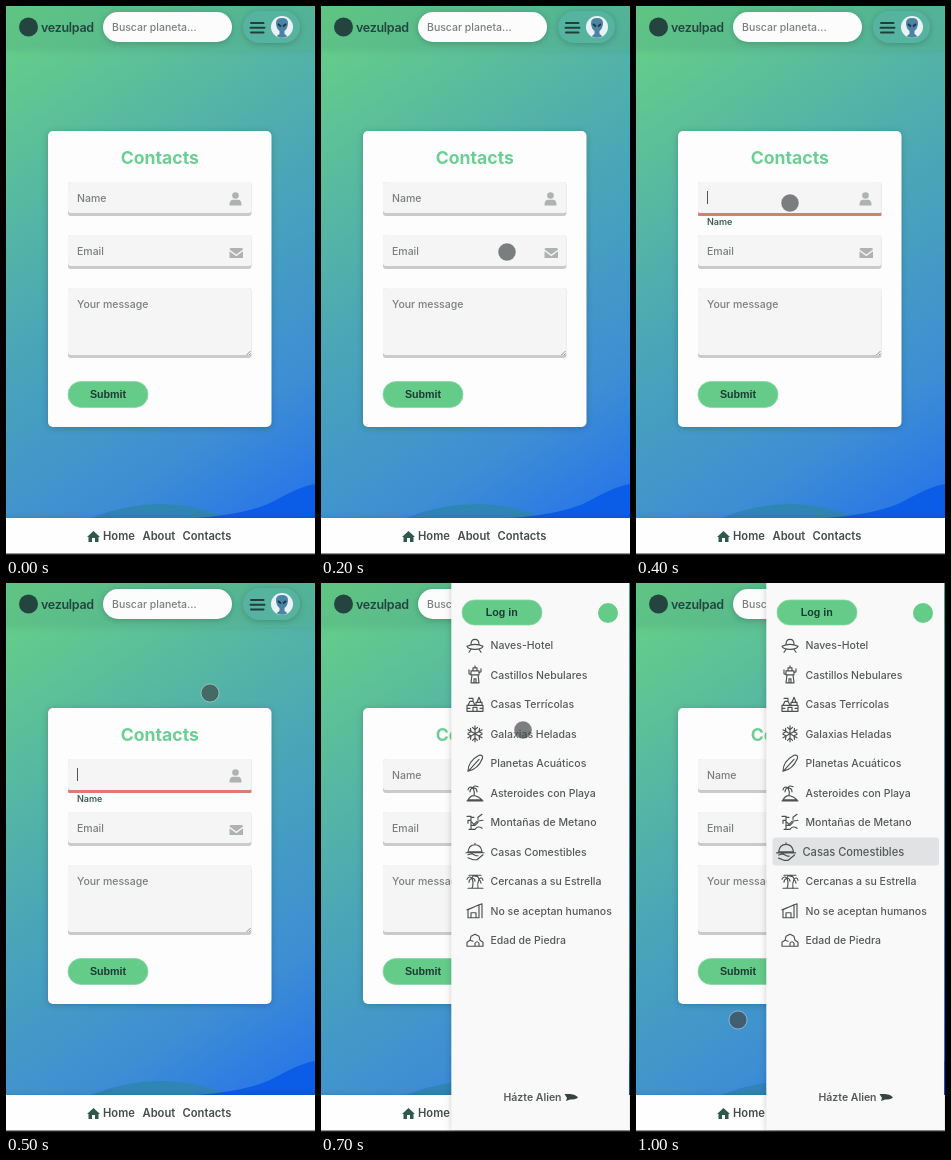
Animation, 309 px wide and 549 px high, one loop 1100 ms. Source, as an HTML page:

```html
<!DOCTYPE html>
<html lang="es">
<head>
<meta charset="utf-8">
<title>Contacts</title>
<style>
html, body { margin: 0; width: 100%; height: 100%; overflow: hidden; background: #fff; }
svg { display: block; width: 309px; height: 549px; font: 500 10.5px Inter, sans-serif; }
text { fill: #555958; }
.hint { fill: #7b7f7e; }
.button { font: bold 10.7px "Liberation Sans", Arial, sans-serif; fill: #1c3b34; text-anchor: middle; }
.nav { font-weight: 600; font-size: 11.2px; fill: #454c4b; }
.line { fill: none; stroke: #4c504f; stroke-width: 1.15; stroke-linejoin: round; stroke-linecap: round; }
.soft { filter: drop-shadow(0 1px 3px rgba(0, 0, 0, .2)); }
.pill { fill: #65cb89; stroke: #8ad7a6; stroke-width: .8; }
</style>
</head>
<body>
<svg viewBox="0 0 309 549">
  <defs>
    <linearGradient id="sky" gradientUnits="userSpaceOnUse" x1="-20" y1="25" x2="300" y2="505">
      <stop offset="0" stop-color="#67d184"/>
      <stop offset=".5" stop-color="#4aa5b8"/>
      <stop offset=".8" stop-color="#3d8ed4"/>
      <stop offset="1" stop-color="#2673ea"/>
    </linearGradient>
  </defs>
  <rect width="309" height="549" fill="url(#sky)"/>
  <path d="M85 512Q120 498 155 498T222 512Z" fill="#2d86b4"/>
  <path d="M190 512Q245 508 270 494T309 478V512Z" fill="#0b5ce6"/>

  <g id="header">
    <rect x="-8" y="-8" width="325" height="52" fill="#5cbf95" fill-opacity=".28" class="soft"/>
    <circle cx="22.5" cy="21" r="9.5" fill="#24453f"/>
    <text x="35" y="26" font-size="12.5" font-weight="600" letter-spacing="-.3" style="fill:#24453f">vezulpad</text>
    <rect x="97" y="6" width="129" height="30" rx="15" fill="#fbfcfb" class="soft"/>
    <text x="106" y="25" class="hint">Buscar planeta...</text>
    <rect x="237" y="5" width="57" height="32" rx="16" fill="#56b3a0" class="soft"/>
    <path d="M245 17h12.5M244.5 21.7h14M245 26.5h12.5" stroke="#203f3b" stroke-width="2" stroke-linecap="round"/>
    <circle cx="276" cy="21" r="11" fill="#e9f2f4"/>
    <path d="M270 17Q270 12 276 12T282 17Q282 22 278.5 25V28Q281 29 281 30.5Q276 33 271 30.5Q271 29 273.5 28V25Q270 22 270 17Z" fill="#4b83a5"/>
    <path d="M272 18l3 2.5M280 18l-3 2.5" stroke="#1d3545" stroke-width="1.8"/>
  </g>

  <g id="card">
    <rect x="42" y="125" width="223.5" height="296" rx="5" fill="#fdfdfd" class="soft"/>
    <text x="153.8" y="158" font-size="17.6" font-weight="700" text-anchor="middle" style="fill:#6bcf94">Contacts</text>
    <g id="fields"></g>
    <g fill="#aeb2b1">
      <circle cx="229.5" cy="189.5" r="3.3"/>
      <path d="M223.5 199.5V198Q224 193.8 227 193.8H232Q235 193.8 235.5 198V199.5Z"/>
      <path d="M223.5 243.5Q223.5 242 225 242H235.5Q237 242 237 243.5L230.3 248.5ZM223.5 245.2L230.3 250.2L237 245.2V252H223.5Z"/>
    </g>
    <path d="M240.5 349l4-4M243 349l1.5-1.5" stroke="#777" stroke-width=".8"/>
    <rect x="62" y="375.5" width="80" height="26" rx="13" class="pill"/>
    <text x="102" y="392" class="button">Submit</text>
  </g>
  <g id="focus">
    <rect x="62" y="207" width="183.5" height="3" rx="1" fill="#dc7b70"/>
    <path d="M71.5 185v13" stroke="#555"/>
    <text x="71" y="219" font-size="9" style="font-weight:600;fill:#3d5d54">Name</text>
  </g>

  <g id="footer">
    <rect y="512" width="309" height="36" fill="#fefefe" class="soft"/>
    <path d="M81 531L87.5 525L94 531H92.5V536H89V532H86V536H82.5V531Z" fill="#2f594c"/>
    <text x="97" y="534" class="nav">Home</text>
    <text x="136.5" y="534" class="nav">About</text>
    <text x="176.5" y="534" class="nav">Contacts</text>
    <rect y="547.5" width="309" height="1.5" fill="#26282b"/>
  </g>

  <g id="menu">
    <rect x="130.3" width="177.7" height="547" fill="#f9f9f9" class="soft"/>
    <rect x="141" y="17" width="80" height="25" rx="12.5" class="pill"/>
    <text x="180.7" y="33" class="button">Log in</text>
    <circle cx="287" cy="30" r="10" fill="#65cb89"/>
    <rect id="bar" x="136.5" width="166.5" height="28" rx="3" fill="#e0e2e4"/>
    <g id="items"></g>
    <text x="182.5" y="518" font-weight="600">Házte Alien</text>
    <path d="M243.5 511H249Q255 511.5 257 514.5Q254 517 249 516.5L245 518L246 515Z" fill="#38433f"/>
  </g>
  <circle id="touch" r="9" fill="#404645" fill-opacity=".68" stroke="#fff" stroke-opacity=".4"/>
</svg>
<script>
const $ = id => document.getElementById(id);
const show = (id, on) => $(id).setAttribute("visibility", on ? "visible" : "hidden");

const fields = [["Name", 176, 34], ["Email", 229, 34], ["Your message", 282, 70]];
$("fields").innerHTML = fields.map(([label, y, h], i) => `
  <rect x="62" y="${y}" width="183.5" height="${h}" rx="3" fill="#c9cbca"/>
  <rect x="62" y="${y}" width="183.5" height="${h - 3}" rx="3" fill="#f5f5f5"/>
  <text ${i ? "" : 'id="nameHint"'} class="hint" x="71" y="${y + 20}">${label}</text>`).join("");

// Menu entries: label and an outline in an 18px box
const entries = [
  ["Naves-Hotel", "M1 10Q9 6 17 10Q16 13 9 13T1 10ZM5 8Q5 3 9 3T13 8M5 13L3 16M13 13L15 16"],
  ["Castillos Nebulares", "M5 17L6 9H12L13 17ZM5 9V5H13V9M7 5V2H11V5M9 2V0M8 17V13H10V17M5 9L3 8V4M13 7L15 6V3"],
  ["Casas Terrícolas", "M1 16V10H17V16ZM2 10L4 6H7L9 10M10 10V7H16V10M3 3H7V6M11 7L13 2L15 7M7 16V12H11V16M1 13H4M14 13H17"],
  ["Galaxias Heladas", "M9 1V17M2 5L16 13M16 5L2 13M6.5 2.5L9 5L11.5 2.5M6.5 15.5L9 13L11.5 15.5M2 8.5L5 7L4.5 3.5M16 8.5L13 7L13.5 3.5M2 9.5L5 11L4.5 14.5M16 9.5L13 11L13.5 14.5"],
  ["Planetas Acuáticos", "M2 17Q2 7 13 1Q17 0 16.5 4Q12 15 2 17ZM3 16L13 5"],
  ["Asteroides con Playa", "M2 16Q5 11 9 12T16 16ZM8 12Q9 8 7 4M7 4Q3 2 2 6M7 4Q8 1 12 3M7 4Q11 4 11 8M7 4Q4 5 4 8M1 17H17"],
  ["Montañas de Metano", "M1 3H5V7H2V10M5 4H8M5 16V8L8 11L11 8L17 7M5 12H9L12 9M3 16H9Q12 12 16 15M12 4L16 1M12 4V6"],
  ["Casas Comestibles", "M2 9Q3 2 9 2T16 9ZM9 2V.5M0 10H18M2 12L6 11L10 13H12M2 15L7 17H11L17 12"],
  ["Cercanas a su Estrella", "M6 16Q8 11 6 6M12 16Q11 11 13 7M6 6Q3 3 1 7M6 6Q7 2 10 4M6 6Q3 7 3 10M6 6Q9 6 9 9M13 7Q12 3 9 4M13 7Q16 4 17 8M13 7Q15 9 15 11M2 16H17M3 3H15"],
  ["No se aceptan humanos", "M2 16V8L13 3V16ZM1 8L16 2V16M5 16V11H10V16"],
  ["Edad de Piedra", "M1 15V11L4 9L5 5L9 3L13 5L14 9L17 11V15ZM9 15V12Q11 9 13 12V15M4 9L7 10"]
];
const rowY = i => 62.3 + 29.5 * i;
$("items").innerHTML = entries.map(([label, icon], i) => `
  <g><path class="line" d="${icon}" transform="translate(145 ${rowY(i) - 9})"/>
  <text x="169.5" y="${rowY(i) + 3.7}">${label}</text></g>`).join("");
const rows = [...$("items").children];

const STEP = 100, LOOP = 1100;
// Touch positions from 200 ms on, one per step
const path = [[186, 246], [170, 222], [154, 197], [204, 110], [254, 22], [202, 147], [194, 208], [186, 270], [102, 437]];

function draw(now) {
  const step = Math.floor(now % LOOP / STEP);
  const open = step >= 7, focused = step >= 4 && !open;
  const hover = step === 10 ? 7 : step >= 8 ? 3 : -1;
  const spot = path[step - 2];

  show("menu", open);
  show("focus", focused);
  show("nameHint", !focused);
  show("bar", hover >= 0);
  $("bar").setAttribute("y", rowY(hover) - 14.3);
  rows.forEach((row, i) => {
    const y = rowY(i);
    row.setAttribute("transform", i === hover ? `translate(220 ${y}) scale(1.06) translate(-220 ${-y})` : "");
  });
  show("touch", spot);
  if (spot) $("touch").setAttribute("transform", `translate(${spot})`);
}

function tick() {
  draw(performance.now());
  requestAnimationFrame(tick);
}
tick();
</script>
</body>
</html>
```
